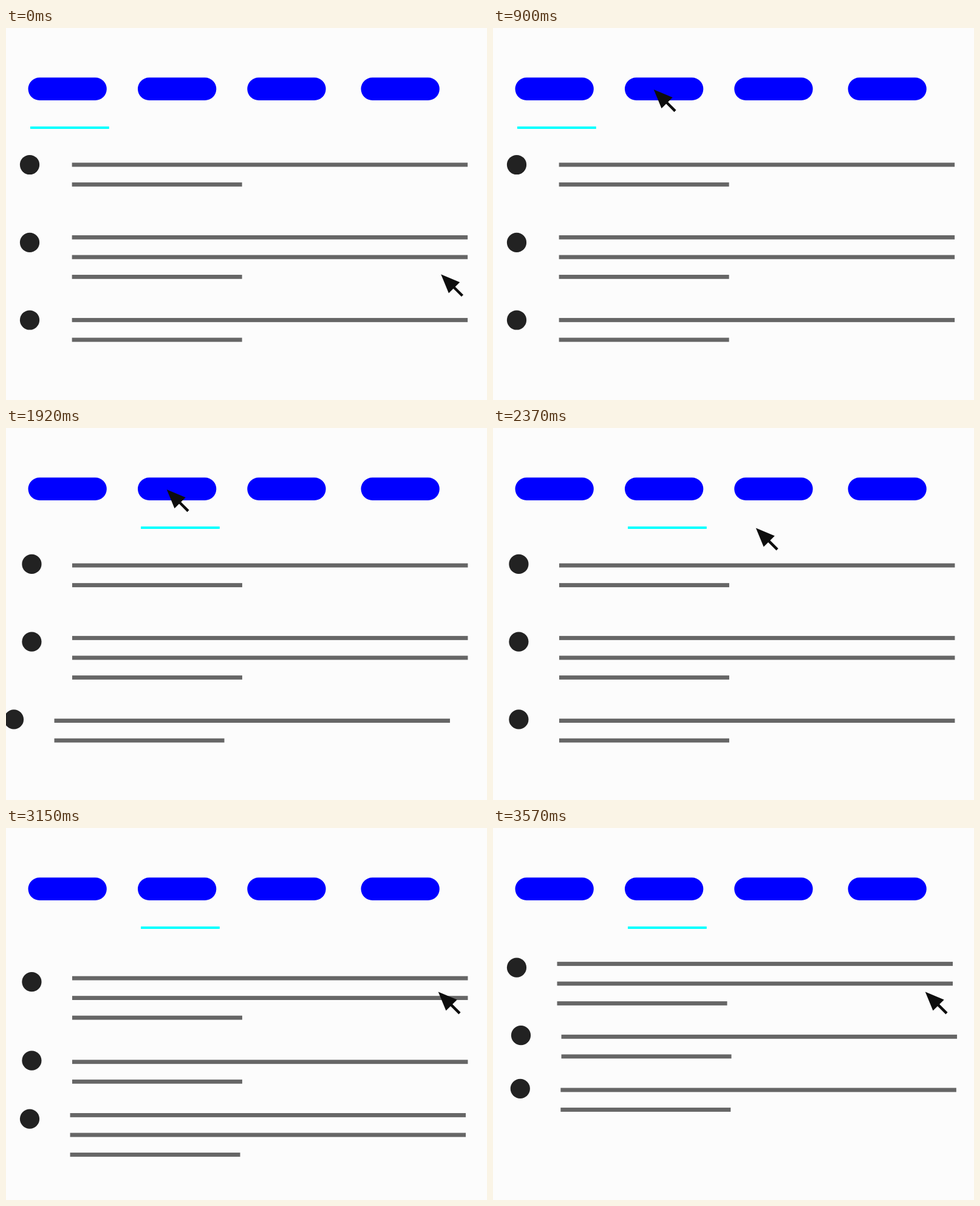
An HTML page with a canvas that plays this animation: 792x612 px, repeating every 3.75 s.

```html
<!DOCTYPE html>
<html lang="en">
<head>
<meta charset="utf-8">
<title>Tabs and list scrolling</title>
<style>
  html, body { margin: 0; width: 100%; height: 100%; overflow: hidden; background: #fcfcfc; }
  canvas { display: block; }
</style>
</head>
<body>
<canvas id="stage" width="792" height="612"></canvas>
<script>
const ctx = document.getElementById("stage").getContext("2d");
const LOOP = 3750, STEP = 30;

const clamp = v => Math.min(1, Math.max(0, v));
const mix = (a, b, p) => a + (b - a) * p;
const smooth = u => u * u * (3 - 2 * u);
const progress = (t, start, end) => clamp((t - start) / (end - start));
const eased = (t, start, end) => smooth(progress(t, start, end));

// Linear departure, soft arrival: cubic bezier (1/6, 1/6, 2/3, 1)
function softStop(x) {
  let low = 0, high = 1;
  const curve = (s, a, b) => 3 * s * (1 - s) ** 2 * a + 3 * s * s * (1 - s) * b + s ** 3;
  for (let i = 0; i < 30; i++) {
    const mid = (low + high) / 2;
    if (curve(mid, 1 / 6, 2 / 3) < x) low = mid; else high = mid;
  }
  return curve(low, 1 / 6, 1);
}

// Linear interpolation through [time, value] keys
function track(time, keys) {
  if (time <= keys[0][0]) return keys[0][1];
  for (let i = 1; i < keys.length; i++) {
    const [t0, v0] = keys[i - 1], [t1, v1] = keys[i];
    if (time <= t1) return mix(v0, v1, (time - t0) / (t1 - t0));
  }
  return keys[keys.length - 1][1];
}

function pill(x, scale) {
  const w = 129.3 * scale, h = 37.5 * scale;
  ctx.fillStyle = "#00f";
  ctx.beginPath();
  ctx.roundRect(x + 64.65 - w / 2, 100.2 - h / 2, w, h, h / 2);
  ctx.fill();
}

// A bullet and its block of lines, each scaled about its own centre
function row({ bulletX, bulletY, x, y, lines, scale = 1 }) {
  if (scale <= 0) return;
  ctx.fillStyle = "#222";
  ctx.beginPath();
  ctx.arc(bulletX, bulletY, 16.1 * scale, 0, 7);
  ctx.fill();
  ctx.fillStyle = "#666";
  for (let i = 0; i < lines; i++) {
    const width = i === lines - 1 ? 280 : 651.5;
    const top = y + ((i - (lines - 1) / 2) * 32.5 - 3.4) * scale;
    ctx.fillRect(x - 325.75 * scale, top, width * scale, 6.8 * scale);
  }
}

const newRow = (bulletX, y, lines, scale) =>
  row({ bulletX, bulletY: y - (lines === 3 ? 26.4 : 18.4), x: bulletX + 392.3, y, lines, scale });

const firstList = [[241.2, 2], [376.9, 3], [496.7, 2]];

function drawFirstList(t) {
  firstList.forEach(([y, lines], i) => {
    const start = 1290 + i * STEP;
    const shift = -1051 * eased(t, start, start + 450);
    row({ bulletX: 39 + shift, bulletY: y - (lines === 3 ? 24 : 16.2), x: 434.4 + shift, y, lines });
  });
}

const secondList = [
  { x: 42.4, lines: 2, y: [[0, 242.3]], scale: [[6, 1], [9, 0]] },
  { x: 42.4, lines: 3, y: [[3, 378], [13, 255]], scale: [[15, 1], [18, 0]] },
  { x: 42.4, lines: 2, y: [[3, 497.8], [16, 340.5], [21, 239.3]], scale: [[21, 1], [24, 0]] },
  { x: 39, lines: 3, y: [[10, 517], [16, 444.6], [25, 256]], scale: [[0, 0], [10, 1]] },
  { x: 46, lines: 2, y: [[16, 504.4], [18, 497.4], [25, 359.6]], scale: [[15, 0], [18, 1]] },
  { x: 44.8, lines: 2, y: [[22.6, 497], [25, 447.2]], scale: [[20, 0], [23, 1]] }
];

function drawSecondList(t) {
  const step = (t - 2820) / STEP;
  secondList.forEach((item, i) => {
    const start = 1590 + Math.min(i, 2) * STEP;
    const shift = -1051 * (1 - eased(t, start, start + 300));
    ctx.save();
    ctx.translate(shift, 0);
    newRow(item.x, track(step, item.y), item.lines, track(step, item.scale));
    ctx.restore();
  });
}

function drawCursor(t) {
  const there = softStop(progress(t, 0, 900));
  const back = eased(t, 2220, 2580);
  ctx.save();
  ctx.translate(
    mix(mix(716.2, 264.7, there), 711.7, back),
    mix(mix(405.2, 101.3, there), 269.6, back));
  ctx.fillStyle = ctx.strokeStyle = "#0d0d0d";
  ctx.beginPath();
  ctx.moveTo(0, 0);
  ctx.lineTo(31, 13);
  ctx.lineTo(12.8, 31);
  ctx.fill();
  ctx.lineWidth = 4.4;
  ctx.beginPath();
  ctx.moveTo(20, 20);
  ctx.lineTo(35.3, 35.3);
  ctx.stroke();
  ctx.restore();
}

function draw(t) {
  ctx.fillStyle = "#fcfcfc";
  ctx.fillRect(0, 0, 792, 612);

  const press = track(t, [[1050, 1], [1140, 1.1], [1230, 1]]);
  [36.5, 217, 397.3, 584.5].forEach((x, i) => pill(x, i === 1 ? press : 1));

  ctx.fillStyle = "#0ff";
  ctx.fillRect(mix(40, 222, eased(t, 1290, 1590)), 162, 129.8, 4);

  drawFirstList(t);
  drawSecondList(t);
  drawCursor(t);
}

const origin = performance.now();
function tick() {
  const t = Math.max(0, performance.now() - origin) % LOOP;
  draw(Math.floor(t / STEP + 0.001) * STEP);
  requestAnimationFrame(tick);
}
tick();
</script>
</body>
</html>
```
